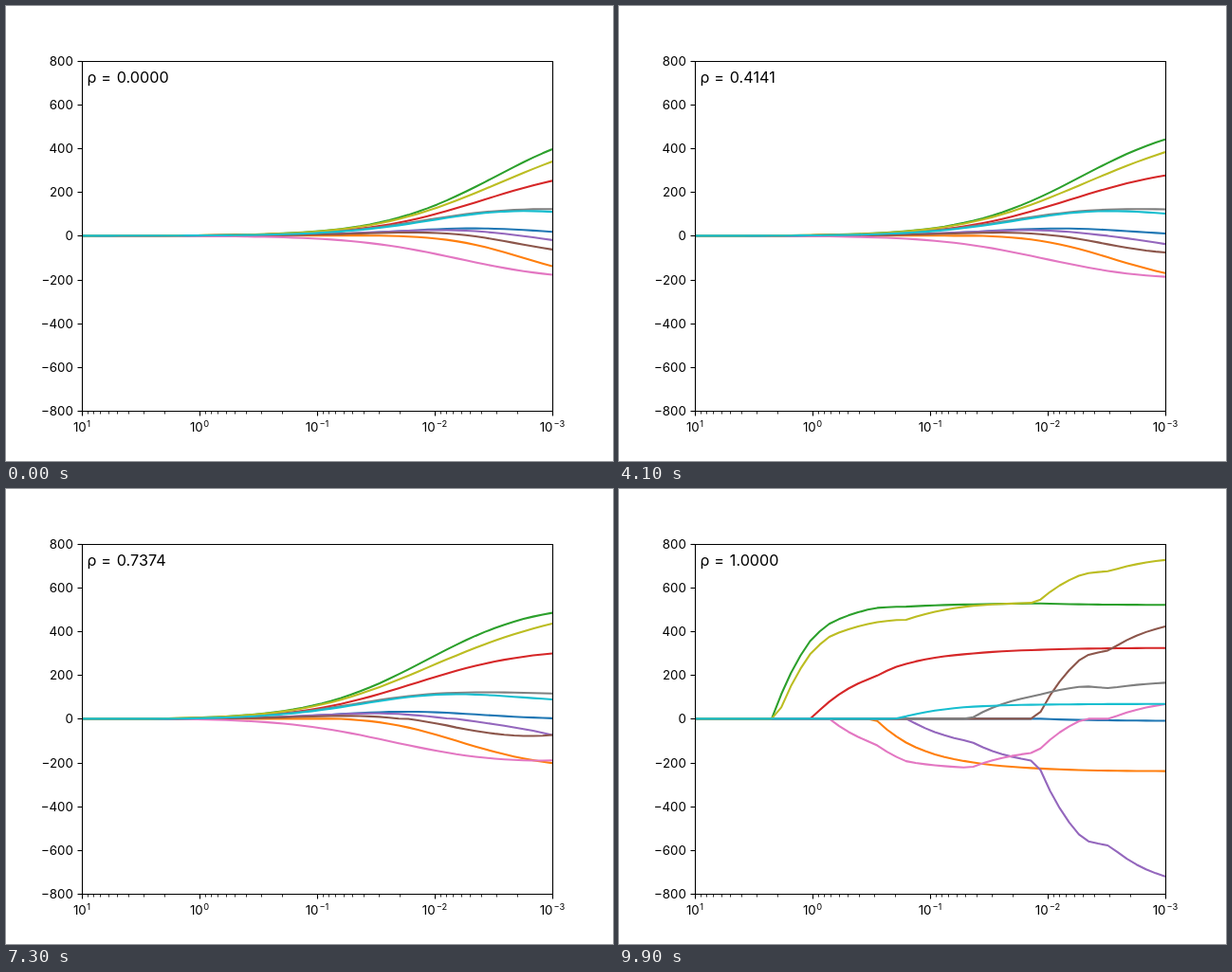
Write an HTML page that moves like this. It is 640x480 px and loops after 10 s.

```html
<!DOCTYPE html>
<html lang="en">
<head>
<meta charset="utf-8">
<title>Elastic net paths</title>
<style>
  html, body { margin: 0; width: 100%; height: 100%; overflow: hidden; background: #fff; }
  svg { display: block; width: 640px; height: 480px; }
  text { font-family: Inter, "Liberation Sans", sans-serif; font-size: 13.3px; }
  .rho text { font-size: 16.2px; }
  .sup { font-size: 9.3px; }
  .end { text-anchor: end; }
  .mid { text-anchor: middle; }
  .curves path { fill: none; stroke-width: 2.083; stroke-linejoin: round; }
  .axes path { fill: none; stroke: #000; stroke-width: 1.11; }
  .axes .minor { stroke-width: .83; }
</style>
</head>
<body>
<svg viewBox="0 0 640 480">
  <clipPath id="plot"><rect x="80" y="57.6" width="496" height="369.6"/></clipPath>
  <g class="curves" clip-path="url(#plot)"></g>
  <g class="axes"><path d="M80.5 58.5H576.5V427.5H80.5Z"/></g>
  <g class="rho">
    <text x="85.4" y="81">ρ</text>
    <text x="100.2" y="81">=</text>
    <text x="116.8" y="81" id="value">0.0000</text>
  </g>
</svg>
<script>
const FRAMES = 100, STEP = 100, POINTS = 50, SAMPLES = 442;
const TOL = 1e-4, MAX_ITER = 1000;
const COLORS = ['#1f77b4', '#ff7f0e', '#2ca02c', '#d62728', '#9467bd',
                '#8c564b', '#e377c2', '#7f7f7f', '#bcbd22', '#17becf'];
const SIZE = COLORS.length;

// Upper triangle of the feature correlations; each row ends with the response.
const UPPER = [
  [.173737, .185085, .335428, .260061, .219243, -.075181, .203841, .270774, .301731, .187889],
  [.088161, .241010, .035277, .142637, -.379090, .332115, .149916, .208133, .043062],
  [.395411, .249777, .261170, -.366811, .413807, .446157, .388680, .586450],
  [.242464, .185548, -.178762, .257650, .393480, .390430, .441482],
  [.896663, .051519, .542207, .515503, .325717, .212022],
  [-.196455, .659817, .318357, .290600, .174054],
  [-.738493, -.398577, -.273697, -.394789],
  [.617859, .417212, .430453],
  [.464669, .565883],
  [.382483]
];
const Y_NORM = 1618.95, YY = Y_NORM * Y_NORM;
const corr = (i, j) => i === j ? 1 : i < j ? UPPER[i][j - i - 1] : UPPER[j][i - j - 1];
const GRAM = COLORS.map((_, i) => COLORS.map((_, j) => corr(i, j)));
const XY = UPPER.map(row => row[row.length - 1] * Y_NORM);

const dot = (a, b) => {
  let sum = 0;
  for (let i = 0; i < SIZE; i++) sum += a[i] * b[i];
  return sum;
};

function dualityGap(w, l1, l2) {
  const gw = GRAM.map(row => dot(row, w));
  const wy = dot(w, XY), ww = dot(w, w);
  const rr = YY - 2 * wy + dot(w, gw);
  const norm = Math.max(...w.map((v, j) => Math.abs(XY[j] - gw[j] - l2 * v)));
  const c = norm > l1 ? l1 / norm : 1;
  const abs = w.reduce((sum, v) => sum + Math.abs(v), 0);
  return .5 * rr * (1 + c * c) + l1 * abs - c * (YY - wy) + .5 * l2 * (1 + c * c) * ww;
}

// Cyclic coordinate descent for one elastic net fit.
function fit(alpha, ratio) {
  const l1 = SAMPLES * alpha * ratio, l2 = SAMPLES * alpha * (1 - ratio);
  const w = Array(SIZE).fill(0);
  for (let n = 0; n < MAX_ITER; n++) {
    let change = 0, largest = 0;
    for (let j = 0; j < SIZE; j++) {
      const old = w[j];
      const r = XY[j] - dot(GRAM[j], w) + old;
      w[j] = Math.sign(r) * Math.max(Math.abs(r) - l1, 0) / (1 + l2);
      change = Math.max(change, Math.abs(w[j] - old));
      largest = Math.max(largest, Math.abs(w[j]));
    }
    if (change <= 1e-9 * largest) break;
    if (change < TOL * largest && dualityGap(w, l1, l2) < TOL * YY) break;
  }
  return w;
}

const xAt = i => 80 + 496 * i / (POINTS - 1);
const yAt = v => 242.4 - v * .231;

function curvePaths(ratio) {
  const fits = Array.from({ length: POINTS }, (_, i) => fit(10 ** (1 - 4 * i / (POINTS - 1)), ratio));
  return COLORS.map((_, j) =>
    'M' + fits.map((w, i) => xAt(i).toFixed(3) + ' ' + yAt(w[j]).toFixed(3)).join('L'));
}

function add(parent, tag, attrs, text = '') {
  const el = document.createElementNS('http://www.w3.org/2000/svg', tag);
  for (const key in attrs) el.setAttribute(key, attrs[key]);
  el.textContent = text;
  return parent.appendChild(el);
}

const axes = document.querySelector('.axes');
for (let v = -800; v <= 800; v += 200) {
  const y = yAt(v);
  add(axes, 'path', { d: `M80.5 ${Math.round(y) + .5}h-5` });
  add(axes, 'text', { x: 70.8, y: y + 4.9, class: 'end' }, String(v).replace('-', '−'));
}
for (let e = 1; e >= -3; e--) {
  const x = 80 + 124 * (1 - e);
  add(axes, 'path', { d: `M${x + .5} 427.5v5` });
  const label = add(axes, 'text', { x, y: 449.3, class: 'mid' }, '10');
  add(label, 'tspan', { dy: -5, dx: e < 0 ? 1 : .5, class: 'sup' }, String(e).replace('-', '−'));
  for (let k = 2; k < 10 && e > -3; k++) {
    const minor = Math.round(x + 124 * (1 - Math.log10(k))) + .5;
    add(axes, 'path', { d: `M${minor} 427.5v3`, class: 'minor' });
  }
}

const curves = document.querySelector('.curves');
const lines = COLORS.map(stroke => add(curves, 'path', { stroke }));
const value = document.getElementById('value');
const cache = [];
let shown = -1;

function draw(time) {
  const frame = Math.floor(Math.max(time, 0) / STEP) % FRAMES;
  if (frame !== shown) {
    const ratio = frame / (FRAMES - 1);
    cache[frame] ??= curvePaths(ratio);
    lines.forEach((line, j) => line.setAttribute('d', cache[frame][j]));
    value.textContent = ratio.toFixed(4);
    shown = frame;
  }
}

const start = performance.now();
function tick() {
  draw(performance.now() - start);
  requestAnimationFrame(tick);
}
tick();
</script>
</body>
</html>
```
